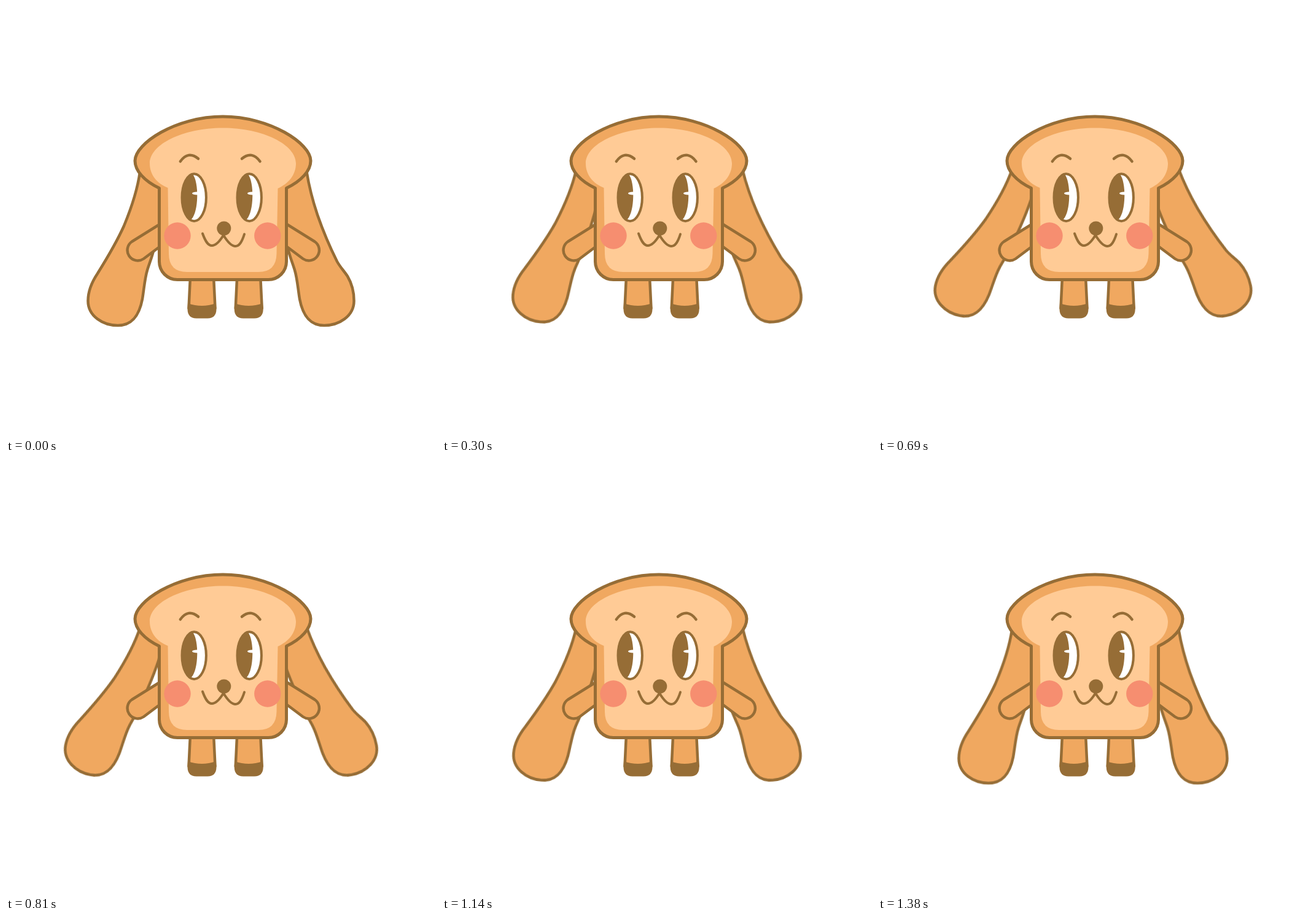
Recreate the animation shown at these times as an HTML page. Size 700 px wide and 700 px high, loop 1410 ms.

```html
<!DOCTYPE html>
<html lang="en">
<head>
<meta charset="utf-8">
<title>Toast puppy</title>
<style>
  html, body { margin: 0; width: 100%; height: 100%; overflow: hidden; background: #fff; }
  svg { display: block; width: 100vw; height: 100vh; }
  .crust { fill: #f0a860; }
  .line { stroke: #966d36; stroke-width: 4.5; stroke-linecap: round; stroke-linejoin: round; }
  .open { fill: none; }
  .dark { fill: #966d36; }
  .ear { animation: 1410ms infinite; }
  .left { transform-origin: 237px 269px; animation-name: swing-left; }
  .right { transform-origin: 463px 269px; animation-name: swing-right; }
  /* 24 steps up and 23 down, 30 ms each */
  @keyframes swing-left {
    0% { transform: rotate(0deg); animation-timing-function: steps(24); }
    51.06383% { transform: rotate(12deg); animation-timing-function: steps(23); }
    100% { transform: rotate(0deg); }
  }
  @keyframes swing-right {
    0% { transform: rotate(0deg); animation-timing-function: steps(24); }
    51.06383% { transform: rotate(-12deg); animation-timing-function: steps(23); }
    100% { transform: rotate(0deg); }
  }
</style>
</head>
<body>
<svg viewBox="0 0 700 700">
  <defs>
    <g id="leg">
      <path class="crust line" d="M300 440L297.500 492H340.500L338 440Z"/>
      <path class="dark" d="M296 484Q319 492 341.500 484L342.500 493Q342.500 508.500 328 508.500H310Q295.500 508.500 295.500 493Z"/>
    </g>
    <path id="arm" class="crust line" d="M262 348L205 383.500A16.700 16.700 0 0 0 224 411.500L262 383Z"/>
    <g id="eye">
      <ellipse cx="306.200" cy="311.700" rx="19.700" ry="38.500" fill="#fff"/>
      <path class="dark" d="M304 274C314 286 314 334 302 347C281 349 281 274 304 274Z"/>
      <ellipse cx="311" cy="305" rx="8" ry="2.500" fill="#fff"/>
      <ellipse class="line open" style="stroke-width:4" cx="306.200" cy="311.700" rx="19.700" ry="38.500"/>
    </g>
  </defs>

  <path class="ear left crust line" d="M223 240L218 270C214 300 204 329 192 358C179 387 163 413 149 435.500C140 449 133.500 464 133.500 480C133.500 505 158 520 182 520C206 520 217 503 222 477C225 458 226 443 230 430C233 420 238 408 241 395C247 372 254 345 258 312C259 300 258 285 256 270Z"/>
  <path class="ear right crust line" d="M484 240L489.500 270C493 292 499 316 507 340C516 366 527 392 539 416C544 425 550 431 556 440C562.500 451 566.500 464 566.500 480C566.500 505 542 520 518 520C494 520 483 503 478 477C475 458 474 443 470 430C467 420 462 408 459 395C453 372 446 345 442 312C441 300 442 285 444 270Z"/>

  <use href="#leg"/>
  <use href="#leg" x="76.200"/>
  <use href="#arm"/>
  <use href="#arm" transform="matrix(-1 0 0 1 707.500 0)"/>

  <path class="crust line" style="stroke-width:5" d="M249.500 296.500C225 285 210 268 210 252C210 224 276 180 353 180C430 180 496 224 496 252C496 268 481 285 456.500 296.500V416A29.500 29.500 0 0 1 427 445.500H279A29.500 29.500 0 0 1 249.500 416Z"/>
  <path fill="#ffcb96" d="M263.500 296C246 289 234 275 234 256C234 226 287 198.500 353 198.500C419 198.500 472 226 472 256C472 275 460 289 442.500 297L440.500 403Q440 433 411 433H295Q265 433 265 403Z"/>

  <g fill="#f68e70">
    <circle cx="279" cy="374" r="21.700"/>
    <circle cx="425.800" cy="374" r="21.700"/>
  </g>
  <use href="#eye"/>
  <use href="#eye" x="90"/>
  <g class="line open">
    <path d="M283.800 253Q296.500 235 313 248.500M384 248.500Q400.500 235 413.500 253"/>
    <path style="stroke-width:4" d="M320 370.500C325 384 329 390 335 390C342 390 348 383 354 373C360 383 367 391 373.500 391C380 391 384 384 388 371.500"/>
  </g>
  <circle class="dark" cx="354.800" cy="362" r="11.500"/>
</svg>
</body>
</html>
```
